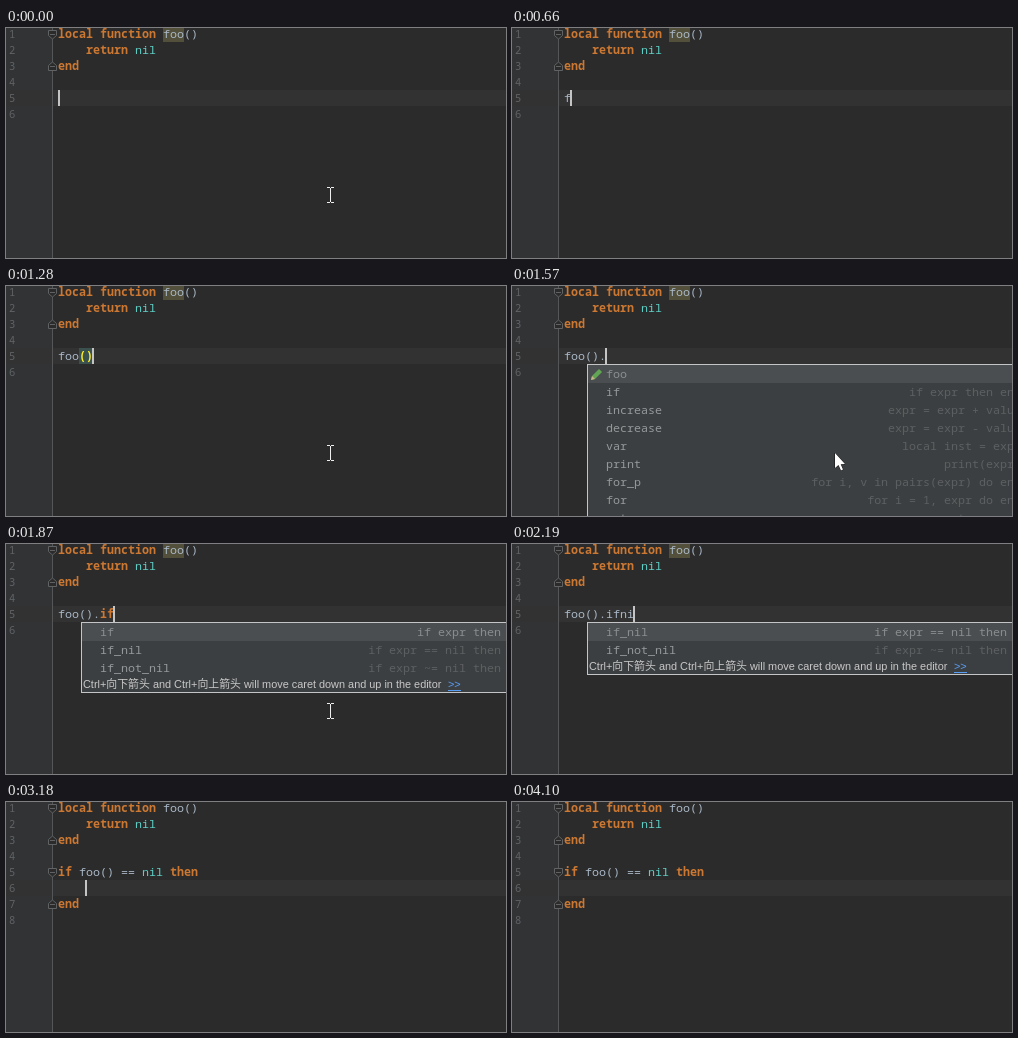
Recreate the animation shown at these times as an HTML page with a canvas. Size 500 px wide and 230 px high, loop 4.18 s.

```html
<!DOCTYPE html>
<html lang="en">
<head>
<meta charset="utf-8">
<title>Postfix completion</title>
<style>
  html, body { margin: 0; width: 100%; height: 100%; overflow: hidden; background: #2b2b2b; }
  canvas { display: block; }
</style>
</head>
<body>
<canvas id="stage" width="500" height="230"></canvas>
<script>
const ctx = document.getElementById('stage').getContext('2d');
const LOOP = 4180, CHAR = 7, LEFT = 52, ROW = 16, ITEM = 18, POPUP_TOP = 78;
const MONO = '11.667px "Noto Sans Mono", monospace';
const HINT = '10.9px "Liberation Sans", "Noto Sans CJK SC", "Noto Sans CJK", sans-serif';
const PLAIN = '#a9b7c6', ORANGE = '#cc7832', CYAN = '#5fcfc6', LINK = '#589df6';

const ifNil = ['if_nil', 'if expr == nil then end'];
const ifNotNil = ['if_not_nil', 'if expr ~= nil then end'];
const ifThen = ['if', 'if expr then end'];
const increase = ['increase', 'expr = expr + value'];
const names = [
  ['foo()', 'void'],
  ['for', 'for i = 1, 10 do end'],
  ['fori', 'for i, v in ipairs(expr) do end'],
  ['forp', 'for k, v in pairs(expr) do end']
];
const postfixes = [
  ['foo', ''], ifThen, increase,
  ['decrease', 'expr = expr - value'],
  ['var', 'local inst = expr'],
  ['print', 'print(expr)'],
  ['for_p', 'for i, v in pairs(expr) do end'],
  ['for', 'for i = 1, expr do end'],
  ['return', 'return expr']
];

const namePopup = (items, match) =>
  ({ items, match, x: 31, width: 456, textX: 52, right: 465, icon: 'function', dim: '#8a8d8f' });
const postfixPopup = (items, right = 523, icon = '') =>
  ({ items, match: 0, x: 75, width: 470, textX: 94, right, icon, dim: '#5d6062' });

const expanded = { lines: ['if foo() == nil then', '', 'end'], caret: [6, 4], count: 8 };
const states = [
  { at: 0, text: '', mouse: 'beam' },
  { at: 120, text: '', mouse: 'beam', hideCaret: true },
  { at: 660, text: 'f' },
  { at: 740, text: 'f', mouse: 'arrow',
    popup: namePopup([...names, ['false', ''], ['function', ''], ['if', ''], ['elseif', ''], ['self', '']], 1) },
  { at: 820, text: 'fo', mouse: 'arrow', popup: namePopup(names, 2) },
  { at: 1280, text: 'foo()', mouse: 'beam', braces: true },
  { at: 1510, text: 'foo().' },
  { at: 1570, text: 'foo().', mouse: 'arrow', popup: postfixPopup(postfixes, 509, 'pencil') },
  { at: 1730, text: 'foo().i', mouse: 'arrow',
    popup: postfixPopup([ifThen, increase, ifNil, ifNotNil, ['for_i', 'for i, v in ipairs(expr) do end']]) },
  { at: 1870, text: 'foo().if', mouse: 'beam', popup: postfixPopup([ifThen, ifNil, ifNotNil]) },
  { at: 2030, text: 'foo().ifn', popup: postfixPopup([ifNil, ifNotNil]) },
  { at: 2190, text: 'foo().ifni', popup: postfixPopup([ifNil, ifNotNil]) },
  { at: 2870, text: 'foo().ifni' },
  { at: 2950, ...expanded },
  { at: 3180, ...expanded, analysed: true },
  { at: 4100, ...expanded, analysed: true, hideCaret: true }
];

const rowTop = line => (line - 1) * ROW - 2;

function rect(x, y, w, h, color) {
  ctx.fillStyle = color;
  ctx.fillRect(x, y, w, h);
}

function write(text, x, y, color, font = MONO, align = 'left') {
  ctx.font = font;
  ctx.textAlign = align;
  ctx.fillStyle = color;
  ctx.fillText(text, x, y);
}

function shape(points, fill, stroke) {
  ctx.beginPath();
  points.forEach(([x, y]) => ctx.lineTo(x, y));
  ctx.closePath();
  ctx.fillStyle = fill;
  ctx.fill();
  if (stroke) {
    ctx.strokeStyle = stroke;
    ctx.lineWidth = 1;
    ctx.stroke();
  }
}

function codeLine(text, line) {
  for (const { 0: word, index } of text.matchAll(/\w+|[^\w\s]+/g)) {
    const keyword = /^(local|function|return|end|if|then)$/.test(word);
    const color = keyword ? ORANGE : word === 'nil' ? CYAN : PLAIN;
    write(word, LEFT + index * CHAR, rowTop(line) + 12, color, keyword ? 'bold ' + MONO : MONO);
  }
}

// Fold handle: points down at a block's start, up at its end.
function foldMark(line, dir) {
  const y = rowTop(line) + 8.5;
  shape([[42.5, y - 4 * dir], [50.5, y - 4 * dir], [50.5, y + dir], [46.5, y + 4.5 * dir], [42.5, y + dir]],
    '#2b2b2b', '#606263');
  rect(44, y - 0.5, 5, 1, '#606263');
}

function drawEditor(s) {
  const lines = s.lines || [s.text];
  const [line, column] = s.caret || [5, s.text.length];
  rect(0, 0, 500, 230, '#2b2b2b');
  rect(0, 0, 46, 230, '#313335');
  rect(0, rowTop(line), 500, ROW, '#323232');
  rect(46, 0, 1, 230, '#555657');
  for (let n = 1; n <= (s.count || 6); n++) {
    write(n, 3, rowTop(n) + 12, '#606366', '10.5px "Noto Sans Mono", monospace');
  }
  if (!s.analysed) rect(LEFT + 15 * CHAR, 0, 3 * CHAR, 14, '#52503a');
  ['local function foo()', '    return nil', 'end', '', ...lines].forEach((t, i) => codeLine(t, i + 1));
  if (s.braces) {
    rect(73, 62, 14, ROW, '#3b514d');
    write('()', 73, 74, '#ffef28', 'bold ' + MONO);
  }
  foldMark(1, 1);
  foldMark(3, -1);
  if (s.analysed) {
    foldMark(5, 1);
    foldMark(7, -1);
  }
  if (!s.hideCaret) rect(Math.max(LEFT, LEFT - 1 + column * CHAR), rowTop(line), 2, ROW, '#c4c4c4');
}

function drawIcon(kind) {
  if (kind === 'function') {
    ctx.beginPath();
    ctx.arc(42, 88, 7, 0, 2 * Math.PI);
    ctx.fillStyle = '#9a5650';
    ctx.fill();
    write('λ', 42, 92, '#4a3a3a', MONO, 'center');
  } else if (kind === 'pencil') {
    shape([[79, 94], [80, 90], [87, 83], [90, 86], [83, 93]], '#62a554');
    shape([[79, 94], [80, 90], [83, 93]], '#c9b48a');
  }
}

function drawPopup(p) {
  const footer = POPUP_TOP + 1 + p.items.length * ITEM;
  const height = footer + 16 - POPUP_TOP;
  rect(p.x, POPUP_TOP, p.width, height, '#c3c5c6');
  rect(p.x + 1, POPUP_TOP + 1, p.width - 2, height - 2, '#3c3f41');
  rect(p.x + 1, POPUP_TOP + 1, p.width - 16, ITEM, '#4b4e50');
  p.items.forEach(([name, detail], i) => {
    const y = POPUP_TOP + 14 + i * ITEM;
    write(name.slice(0, p.match), p.textX, y, '#b06fb5');
    write(name.slice(p.match), p.textX + p.match * CHAR, y, i ? '#96999b' : '#8b8e90');
    write(detail, p.right, y, i ? p.dim : '#8a8d8f', MONO, 'right');
  });
  drawIcon(p.icon);
  const y = footer + 11;
  write('Ctrl+向下箭头 and Ctrl+向上箭头 will move caret down and up in the editor', p.x + 2, y, '#c8c8c8', HINT);
  write('>>', p.x + 367, y, LINK, HINT);
  rect(p.x + 367, y + 2, 13, 1, LINK);
  write('π', p.x + 444, y, '#4a9fd8', '13px "DejaVu Sans", sans-serif');
}

function drawMouse(kind) {
  if (kind === 'beam') {
    rect(321, 159, 3, 1, '#eee');
    rect(325, 159, 3, 1, '#eee');
    rect(324, 160, 1, 14, '#eee');
    rect(321, 174, 3, 1, '#eee');
    rect(325, 174, 3, 1, '#eee');
  } else if (kind === 'arrow') {
    const arrow = [[323, 167], [323, 182], [326.5, 179], [329, 184.5], [331, 183.5], [328.7, 178.2], [333, 178]];
    shape(arrow, '#111', '#111');
    shape(arrow, '#fff');
  }
}

function frame(now) {
  const time = now % LOOP;
  const s = states.findLast(state => state.at <= time) || states[0];
  drawEditor(s);
  if (s.popup) drawPopup(s.popup);
  drawMouse(s.mouse);
  requestAnimationFrame(frame);
}
frame(0);
</script>
</body>
</html>
```
